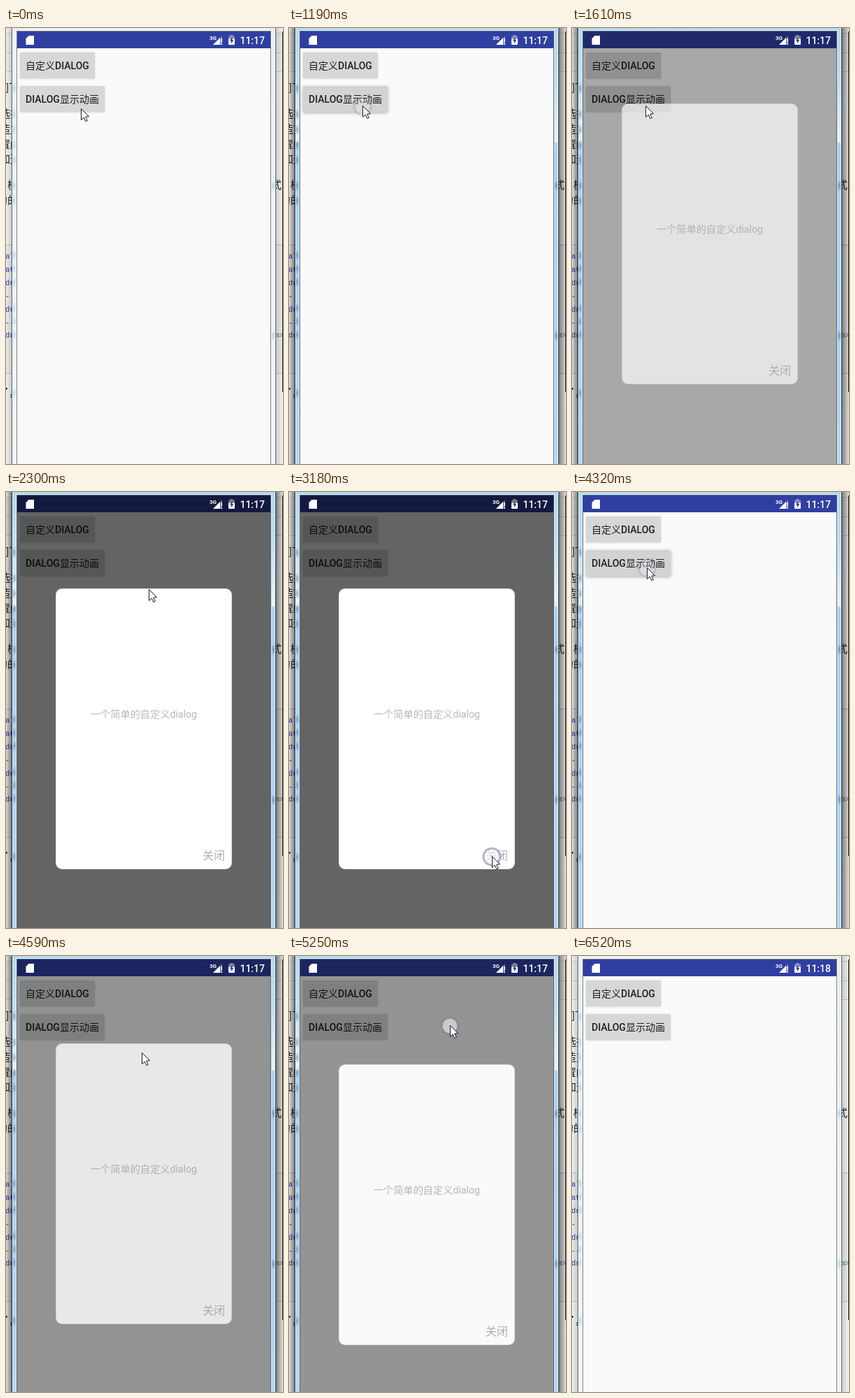
An HTML page with a canvas for the animation above (6620 ms loop, 396 by 624 pixels).

```html
<!DOCTYPE html>
<html lang="zh">
<head>
<meta charset="utf-8">
<title>Dialog animation</title>
<style>
html, body { margin: 0; width: 100%; height: 100%; overflow: hidden; background: #fff; }
canvas { display: block; width: 396px; height: 624px; }
</style>
</head>
<body>
<canvas id="stage" width="396" height="624"></canvas>
<script>
const W = 396, H = 624, LOOP = 6620;
const SANS = "Roboto, 'Noto Sans CJK SC', 'Noto Sans CJK', sans-serif";
const MONO = "'Liberation Mono', monospace";
const stage = document.getElementById('stage').getContext('2d');
let ctx = stage;

// Periods of movement; inside each the picture refreshes about every 140 ms.
const RUNS = [[0, 0], [460, 610], [1070, 2030], [2150, 3180], [3330, 4320], [4470, 4980],
  [5250, 6210], [6520, 6520]];
const FOCUS = 1070, BLUR = 6520;

// Pointer key points: time, x, y
const PATH = [[0, 107, 115], [610, 105, 111], [2030, 105, 111], [2297, 204, 139],
  [2600, 337, 330], [2890, 290, 521], [3330, 290, 521], [3470, 280, 465], [4040, 107, 108],
  [4320, 107, 108], [4597, 194, 138], [4860, 230, 99], [5400, 230, 99], [6210, 400, 136]];

const ANIM = 300;
const DIALOG = { x: 71, y: 138, w: 252, h: 402 };
const DIALOGS = [{ open: 1400, close: 3224 }, { open: 4351, close: 5188 }];

// Text of the page behind the window
const prose = { font: '15px ' + SANS, color: '#222', step: 21.8 };
const code = { font: '10.5px ' + MONO, color: '#3a2fb0', step: 18.9 };
const BLOCKS = [
  { ...prose, x: -11, y: 91, lines: ['们下'] },
  { ...prose, x: -9, y: 128, lines: ['选择', '造方', '置的', '加透'] },
  { ...prose, x: -13, y: 230, lines: ['、楼', '的的'] },
  { ...prose, x: -11, y: 527, lines: ['了，'] },
  { ...code, x: -1, y: 330, lines: ['al', 'at', 'dr', '-', 'dr', '--', 'dr'] }
];

const clamp = v => Math.max(0, Math.min(1, v));
const mix = (a, b, k) => a + (b - a) * k;

function sample(t) {
  const [from, to] = RUNS.findLast(r => r[0] <= t);
  if (from === to) return from;
  const steps = Math.round((to - from) / 140);
  const step = (to - from) / steps;
  return from + step * Math.min(steps, Math.floor((t - from) / step + 0.15));
}

function rect(x, y, w, h, fill) {
  ctx.fillStyle = fill;
  ctx.fillRect(x, y, w, h);
}

function round(x, y, w, h, r, fill) {
  ctx.beginPath();
  ctx.roundRect(x, y, w, h, r);
  ctx.fillStyle = fill;
  ctx.fill();
}

function poly(points, fill) {
  ctx.beginPath();
  points.forEach(([x, y]) => ctx.lineTo(x, y));
  ctx.closePath();
  ctx.fillStyle = fill;
  ctx.fill();
}

function circle(x, y, r) {
  ctx.beginPath();
  ctx.arc(x, y, r, 0, 2 * Math.PI);
}

function text(str, x, y, font, fill, align = 'left') {
  ctx.font = font;
  ctx.textAlign = align;
  ctx.fillStyle = fill;
  ctx.fillText(str, x, y);
}

function gradient(x0, y0, x1, y1, ...stops) {
  const g = ctx.createLinearGradient(x0, y0, x1, y1);
  stops.forEach(([at, color]) => g.addColorStop(at, color));
  return g;
}

function pointerAt(t) {
  const i = PATH.findIndex(p => p[0] > t);
  if (i < 0) return null;
  const [t0, x0, y0] = PATH[i - 1], [t1, x1, y1] = PATH[i];
  const k = (t - t0) / (t1 - t0);
  return [mix(x0, x1, k), mix(y0, y1, k)];
}

// Slides in from above, leaves downwards; fades both ways.
function dialogAt(t) {
  const d = DIALOGS.find(d => t > d.open && t < d.close + ANIM);
  if (!d) return null;
  if (t < d.close) {
    const x = clamp((t - d.open) / ANIM);
    return { dy: -DIALOG.h * (1 - x) ** 2, alpha: x ** 1.2, dim: 0.6 * x ** 1.9 };
  }
  const x = (t - d.close) / ANIM;
  return { dy: DIALOG.h * x * x, alpha: 1 - x * x, dim: 0.6 * clamp(1 - 1.55 * x) };
}

const pressing = t => DIALOGS.some(d => t >= d.open - 330 && t < d.open);
const dismissing = t => DIALOGS.some(d => t >= d.close - 60 && t < d.close + 200);

function page(active) {
  rect(0, 0, W, H, '#fff');
  rect(0, 8, W, 54, '#fafafa');
  [7, 35, 62].forEach(y => rect(0, y, W, 1, '#d5d5d5'));
  rect(0, 311, W, 183, '#f8f8f8');
  [310, 494].forEach(y => rect(0, y, W, 1, '#ccc'));

  BLOCKS.forEach(b => b.lines.forEach((s, i) => text(s, b.x, b.y + i * b.step, b.font, b.color)));
  text('式', 379, 230, prose.font, prose.color);
  text('m', 384.5, 443, code.font, '#8a6a35');
  text('>', 390.5, 443, code.font, '#2277cc');
  rect(395, 5, 1, 516, '#111');

  const a = active ? 0.5 : 0.2;
  const dark = `rgba(0,0,0,${a})`, light = `rgba(0,0,0,${a * 0.25})`;
  rect(0, 0, 8, H, gradient(0, 0, 8, 0, [0, light], [1, dark]));
  rect(386, 0, 10, H, gradient(386, 0, 396, 0, [0, dark], [1, light]));
}

function windowFrame(active) {
  const glass = active
    ? gradient(0, 0, 0, H, [0, '#b8d6ee'], [0.12, '#c4dcf0'], [0.26, '#eaf4fb'],
        [0.265, '#acd0ef'], [1, '#b5d5f2'])
    : gradient(0, 0, 0, H, [0, '#e9eff1'], [1, '#f2f5f6']);
  rect(8, 0, 378, H, glass);

  // Page text seen blurred through the glass border
  ctx.save();
  ctx.beginPath();
  ctx.rect(9, 0, 6, H);
  ctx.rect(379, 0, 6, H);
  ctx.clip();
  ctx.filter = 'blur(2px)';
  const tint = active ? 'rgba(70,105,140,.5)' : 'rgba(140,205,250,.65)';
  BLOCKS.forEach(b => b.lines.forEach((s, i) => {
    if (s.length > 1) rect(8, b.y + i * b.step - 9, 6, 9, tint);
  }));
  [225, 440].forEach(y => rect(379, y - 4, 8, 9, tint));
  ctx.restore();

  const edge = active ? '#26323d' : '#5c6062';
  const shine = active ? '#dff5fc' : '#fbfdfd';
  const inner = active ? '#52667c' : '#777d82';
  [8, 385].forEach(x => rect(x, 0, 1, H, edge));
  [9, 384].forEach(x => rect(x, 0, 1, H, shine));
  [14, 379].forEach(x => rect(x, 4, 1, H, shine));
  rect(14, 3, 366, 1, shine);
  [15, 378].forEach(x => rect(x, 4, 1, H, inner));
  rect(15, 4, 364, 1, inner);
}

function button(label, y, w, pressed) {
  ctx.save();
  ctx.shadowColor = `rgba(0,0,0,${pressed ? 0.3 : 0.22})`;
  ctx.shadowBlur = pressed ? 5 : 2;
  ctx.shadowOffsetY = pressed ? 1.5 : 0.5;
  round(20, y, w, 37, 2, pressed ? '#d2d3d3' : '#d6d7d7');
  ctx.restore();
  text(label, 28, y + 24, '500 14px ' + SANS, '#1f1f1f');
}

function statusIcons(clock) {
  poly([[32.5, 11], [40, 11], [40, 24], [28.5, 24], [28.5, 15]], '#fff');

  text('3G', 291, 16.5, '700 8px ' + SANS, '#fff');
  poly([[309, 11], [309, 24], [296, 24]], 'rgba(255,255,255,.35)');
  poly([[306, 14], [306, 24], [296, 24]], '#fff');
  rect(307.5, 15, 1.5, 5.5, '#fff');
  rect(307.5, 22, 1.5, 2, '#fff');

  rect(320.5, 10, 4, 2, 'rgba(255,255,255,.4)');
  round(318, 11.5, 9, 5, 1, 'rgba(255,255,255,.4)');
  round(318, 15.5, 9, 8.5, 1, '#fff');
  poly([[323.2, 13], [320, 18.6], [322, 18.6], [322, 22.6], [325.2, 17], [323.2, 17]], '#303a70');

  text(clock, 370, 23, '500 14px ' + SANS, '#fff', 'right');
}

// The dialog is painted once on its own layer so that it fades as a whole.
function makeDialog() {
  const layer = document.createElement('canvas');
  layer.width = W;
  layer.height = H;
  ctx = layer.getContext('2d');
  const { x, y, w, h } = DIALOG;
  round(x, y, w, h, 9, '#d0d0d0');
  round(x + 0.7, y + 0.7, w - 1.4, h - 1.4, 8.4, '#fff');
  text('一个简单的自定义dialog', x + w / 2, 323, '14.2px ' + SANS, '#b8b8b8', 'center');
  text('关闭', 281, 526, '500 16px ' + SANS, '#b0b0b0');
  ctx = stage;
  return layer;
}

function tapRing([x, y], strength) {
  ctx.save();
  ctx.globalAlpha = strength;
  circle(x, y + 1, 10.5);
  ctx.fillStyle = 'rgba(255,255,255,.5)';
  ctx.fill();
  circle(x, y + 1, 12);
  ctx.lineWidth = 3;
  ctx.strokeStyle = 'rgba(130,130,165,.6)';
  ctx.stroke();
  ctx.restore();
}

function pointer([x, y]) {
  ctx.save();
  ctx.translate(Math.round(x) + 0.5, Math.round(y) + 0.5);
  poly([[0, 0], [0, 16], [3.7, 12.6], [6.4, 18.2], [8.8, 17.1], [6.2, 11.6], [11, 11.2]], '#fff');
  ctx.lineJoin = 'round';
  ctx.strokeStyle = '#16162c';
  ctx.stroke();
  ctx.restore();
}

const dialogLayer = makeDialog();

function draw(t) {
  const active = t >= FOCUS && t < BLUR;
  const dialog = dialogAt(t);
  const tip = pointerAt(t);

  page(active);
  windowFrame(active);

  ctx.save();
  ctx.beginPath();
  ctx.rect(16, 5, 362, H);
  ctx.clip();
  rect(16, 5, 362, 24, '#303f9f');
  rect(16, 29, 362, H, '#fafafa');
  button('自定义DIALOG', 35, 107, false);
  button('DIALOG显示动画', 83, 121, pressing(t));
  if (dialog) rect(16, 5, 362, H, `rgba(0,0,0,${dialog.dim})`);
  statusIcons(t < BLUR ? '11:17' : '11:18');
  if (dialog) {
    ctx.globalAlpha = dialog.alpha;
    ctx.drawImage(dialogLayer, 0, Math.round(dialog.dy));
  }
  ctx.restore();

  if (tip) {
    if (pressing(t)) tapRing(tip, 0.4);
    if (dismissing(t)) tapRing(tip, 1);
    pointer(tip);
  }
}

const start = performance.now();
function loop() {
  draw(sample((performance.now() - start) % LOOP));
  requestAnimationFrame(loop);
}
loop();
</script>
</body>
</html>
```
